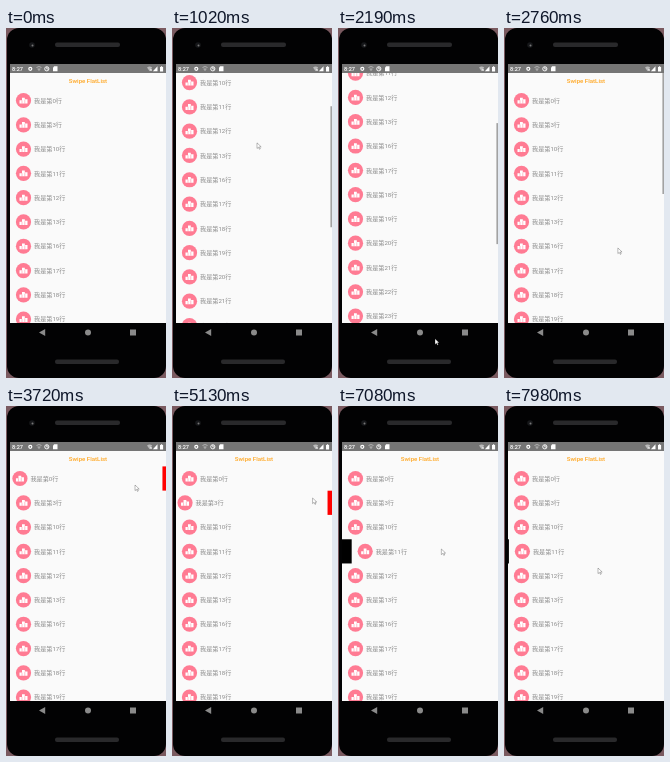
Recreate the animation shown at these times as an HTML page. Size 160 by 350 pixels, loop 8000 ms.

```html
<!DOCTYPE html>
<html lang="zh">
<head>
<meta charset="utf-8">
<style>
html, body { margin: 0; width: 100%; height: 100%; overflow: hidden; background: #7a5a60; }
svg { display: block; width: 100vw; height: 100vh; }
text { font-family: Roboto, "Noto Sans CJK SC", "Noto Sans CJK", sans-serif; }
</style>
</head>
<body>
<svg viewBox="0 0 160 350">
  <defs>
    <clipPath id="view"><rect x="4" y="45" width="156" height="250"/></clipPath>
  </defs>
  <rect x="1" width="159" height="350" rx="12" fill="#020203"/>
  <rect x="49" y="14.5" width="65" height="4.5" rx="2" fill="#29292b"/>
  <rect x="49" y="331.5" width="64" height="4.5" rx="2" fill="#29292b"/>
  <circle cx="26" cy="17" r="2.8" fill="#16171a"/>
  <circle cx="26.5" cy="17.5" r="1" fill="#777"/>

  <rect x="4" y="36" width="156" height="9" fill="#757575"/>
  <g fill="#fff">
    <text x="6" y="42.9" font-size="5.6" font-weight="500">8:27</text>
    <circle cx="24.3" cy="40.8" r="1.5" fill="none" stroke="#fff" stroke-width="1.2"/>
    <path d="M30.5 39.5q2.5-2 5 0M31.5 41h3M33 41v2" fill="none" stroke="#ccc" stroke-width=".7"/>
    <circle cx="40.8" cy="40.8" r="2.1" fill="none" stroke="#fff" stroke-width=".9"/>
    <path d="M40.8 39v2h1.8" fill="none" stroke="#fff" stroke-width=".8"/>
    <path d="M47 39.5l1.2-1.2h3.3v5H47Z"/>
    <path d="M141 39.4q2.6-2 5.2 0l-2.6 3.8Z" opacity=".5"/>
    <path d="M144 41l2 2m0-2l-2 2" stroke="#fff" stroke-width=".6"/>
    <path d="M151.5 38.3v5h-4.6Z"/>
    <path d="M154 39h.9v-.8h1.3v.8h.9v4.4H154Z"/>
  </g>

  <rect x="4" y="45" width="156" height="250" fill="#fafafa"/>
  <g clip-path="url(#view)">
    <g id="list">
      <text x="82" y="54.6" font-size="6.1" font-weight="500" fill="#ffa620" text-anchor="middle">Swipe FlatList</text>
    </g>
    <rect id="bar" x="158.4" width="1.6" height="121" fill="#a2a2a2"/>
  </g>

  <g fill="#8a8a8a">
    <path d="M33 304.5l6.2-3.5v7Z"/>
    <circle cx="82" cy="304.5" r="3"/>
    <rect x="124" y="301.5" width="6" height="6"/>
  </g>
  <path id="cursor" d="M0 0V5.6L1.4 4.4L2.4 6.4L3.3 6L2.4 4H4.2Z" fill="#fff" stroke="#000" stroke-opacity=".45" stroke-width=".6"/>
</svg>
<script>
const LOOP = 8000, PITCH = 24.29, OPEN = 31, DRAG = 360;
const $ = id => document.getElementById(id);
const numbers = [0, 3, 10, 11, 12, 13, ...Array.from({ length: 15 }, (_, i) => 16 + i)];

const rows = numbers.map((n, i) => {
  const g = document.createElementNS('http://www.w3.org/2000/svg', 'g');
  g.setAttribute('transform', `translate(0 ${72.5 + i * PITCH})`);
  g.innerHTML = `<rect y="-12.1" height="24.2" width="0"/>
    <g><circle cx="17.5" r="7.6" fill="#ff7b93"/>
    <path d="M13.5 3V-.2h2.5V-2.8h2.8v1.6h2.7V3Z" fill="#fff"/>
    <path d="M16-.2V3M18.8-.8V3" stroke="#ff7b93" stroke-width=".5"/>
    <text x="28" y="2.2" font-size="6.15" fill="#8c8c8c">我是第${n}行</text></g>`;
  $('list').append(g);
  return { action: g.children[0], body: g.children[1] };
});

// Row i is grabbed at (x, y), pulled in direction dir, then springs shut
const swipes = [
  { start: 3645, x: 140, y: 79, dir: -1 },
  { start: 5045, x: 153, y: 92, dir: -1 },
  { start: 6005, x: 140, y: 119, dir: -1 },
  { start: 6947, x: 84, y: 143, dir: 1 },
];
const pointer = [
  [60, 22, 350], [600, 88, 183], [1020, 85, 115], [1400, 86, 60], [2190, 97, 311],
  ...swipes.flatMap(({ start, x, y, dir }) => [[start, x, y], [start + DRAG, x + 52 * dir, y]]),
  [7980, 94, 162],
];

function ease(from, to, t) {
  const x = Math.min(1, Math.max(0, (t - from) / (to - from)));
  return x * x * (3 - 2 * x);
}

function pointerAt(t) {
  const i = pointer.findIndex(p => p[0] > t);
  if (i < 1) return pointer.at(i).slice(1);
  const [t0, x0, y0] = pointer[i - 1], [t1, x1, y1] = pointer[i];
  const k = (t - t0) / (t1 - t0);
  return [x0 + (x1 - x0) * k, y0 + (y1 - y0) * k];
}

function draw(t) {
  const y = 235 * (ease(600, 1800, t) - ease(1800, 2512, t));
  $('list').setAttribute('transform', `translate(0 ${-y})`);
  $('bar').setAttribute('y', 45 + y / 2);
  $('bar').setAttribute('opacity', ease(600, 660, t) - ease(2850, 3120, t));

  swipes.forEach(({ start, dir }, i) => {
    const pull = OPEN * (ease(start, start + DRAG, t) - ease(start + 738, start + 1068, t));
    const { action, body } = rows[i];
    body.setAttribute('transform', `translate(${pull * dir})`);
    action.setAttribute('x', dir < 0 ? 160 - pull : 4);
    action.setAttribute('width', pull);
    action.setAttribute('fill', dir < 0 ? '#f00' : '#000');
  });

  $('cursor').setAttribute('transform', `translate(${pointerAt(t)})`);
  $('cursor').setAttribute('visibility', t < 60 ? 'hidden' : 'visible');
}

const start = performance.now();
(function frame() {
  draw((performance.now() - start) % LOOP);
  requestAnimationFrame(frame);
})();
</script>
</body>
</html>
```
